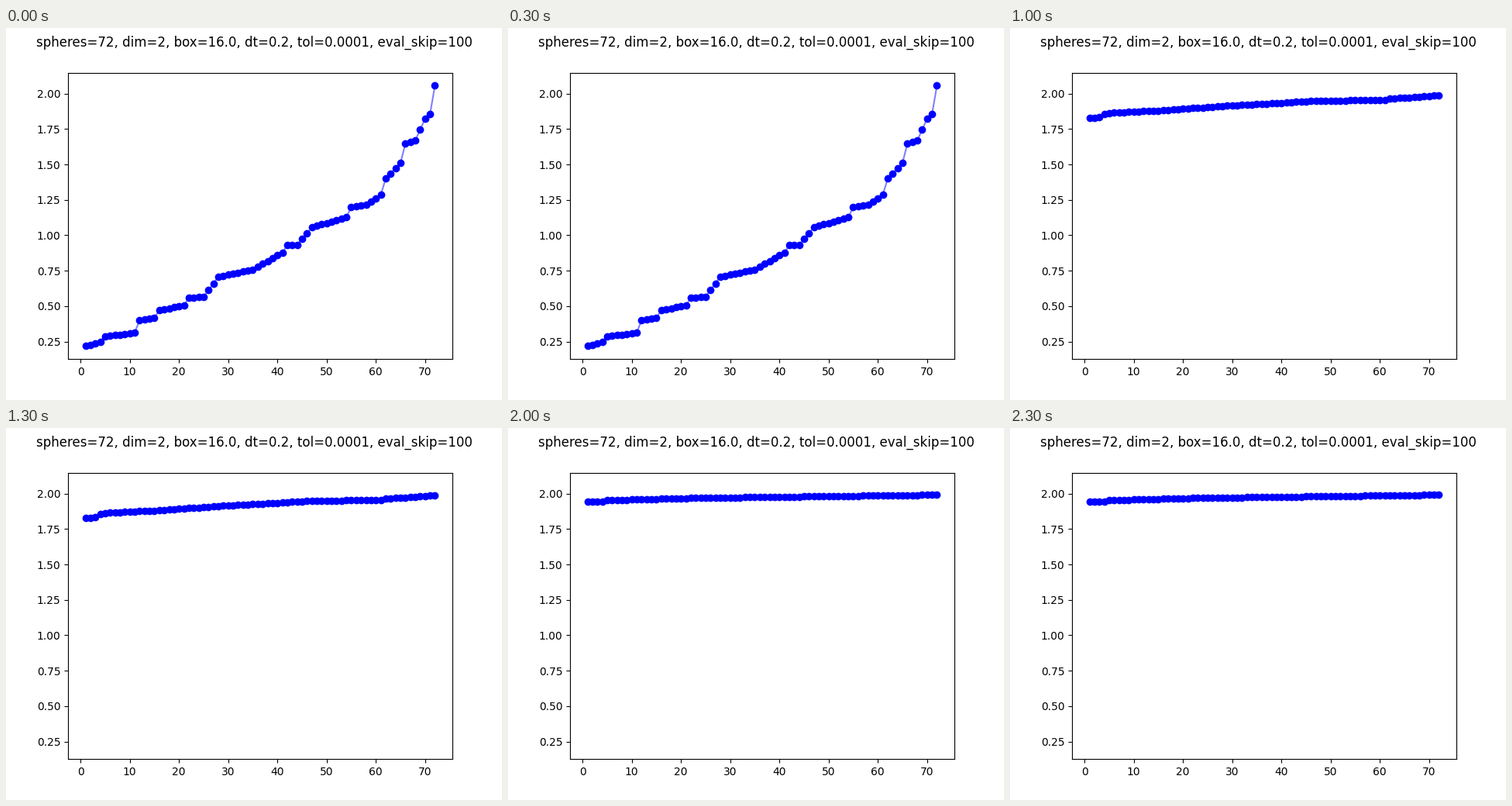
Animation, 640 px wide and 480 px high, one loop 2.5 s. Source, as a matplotlib script:

```python
import numpy as np
import matplotlib.pyplot as plt
from matplotlib.animation import FuncAnimation

RANKS = np.arange(1, 73)
STEP_MS = 500


def curve(*points):
    """Sorted distances, linear between (rank, distance) key points."""
    return np.interp(RANKS, *zip(*points))


# Random layout: plateaus of close pairs, then a steep tail
start = curve(
    (1, 0.2178), (4, 0.248), (5, 0.285), (11, 0.313), (12, 0.400),
    (15, 0.417), (16, 0.470), (21, 0.506), (22, 0.557), (25, 0.565),
    (28, 0.708), (35, 0.758), (41, 0.878), (42, 0.930), (44, 0.932),
    (47, 1.057), (54, 1.128), (55, 1.198), (58, 1.215), (61, 1.286),
    (62, 1.400), (65, 1.510), (66, 1.647), (68, 1.669), (70, 1.823),
    (71, 1.855), (72, 2.0567))

# Relaxing layouts flatten towards a distance of 2
steps = [
    start,
    curve((1, 1.802), (12, 1.829), (20, 1.852), (26, 1.876), (33, 1.878),
          (41, 1.895), (42, 1.908), (58, 1.931), (59, 1.942), (69, 1.956),
          (72, 1.977)),
    curve((1, 1.827), (3, 1.833), (4, 1.857), (6, 1.866), (17, 1.884),
          (27, 1.911), (47, 1.949), (61, 1.956), (62, 1.964), (72, 1.988)),
    curve((1, 1.866), (5, 1.893), (12, 1.902), (32, 1.942), (42, 1.945),
          (50, 1.964), (67, 1.979), (72, 1.988)),
    curve((1, 1.942), (4, 1.945), (5, 1.953), (22, 1.969), (72, 1.992)),
]

fig, ax = plt.subplots(figsize=(6.4, 4.8), dpi=100)
fig.suptitle("spheres=72, dim=2, box=16.0, dt=0.2, tol=0.0001, eval_skip=100")
line, = ax.plot(RANKS, start, "b-", alpha=0.5)
dots, = ax.plot(RANKS, start, "bo")
ax.set(xlim=ax.get_xlim(), ylim=ax.get_ylim())


def draw(step):
    for artist in (line, dots):
        artist.set_ydata(steps[step])
    return line, dots


anim = FuncAnimation(fig, draw, frames=len(steps), interval=STEP_MS,
                     repeat=True)
plt.show()
```
